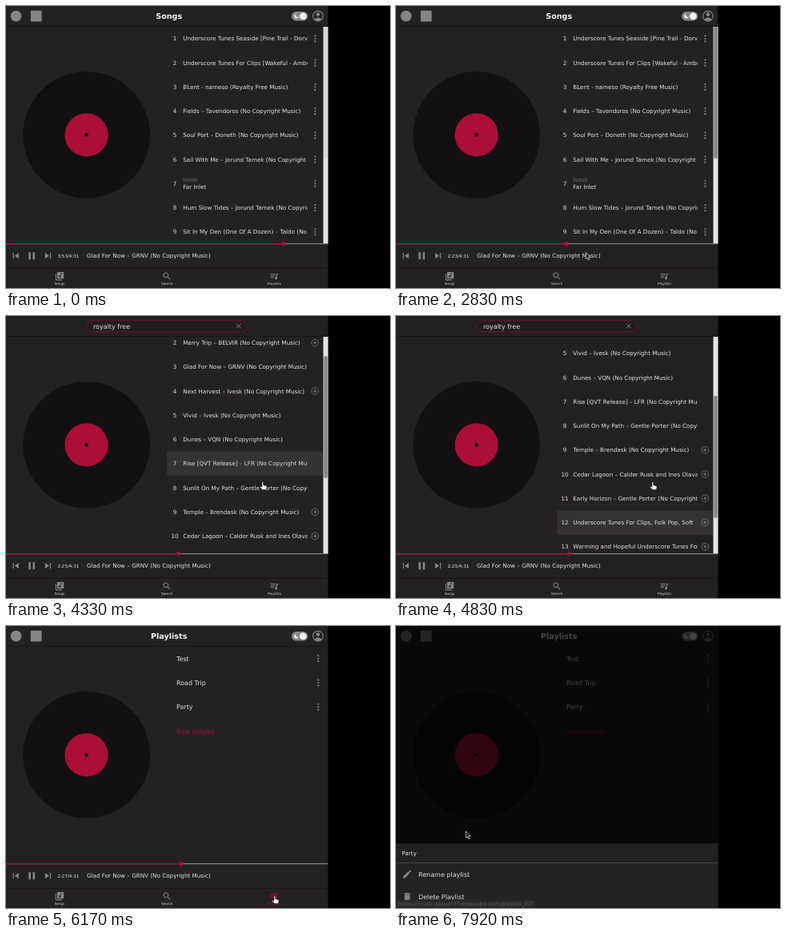
These frames come from a looping animation (480 px wide and 353 px high, 8 s). An HTML page:

```html
<!DOCTYPE html>
<html lang="en">
<head>
<meta charset="utf-8">
<title>Music player</title>
<style>
  html, body { margin: 0; width: 480px; height: 353px; overflow: hidden; background: #000; }
  svg { display: block; }
  text { font-family: "DejaVu Sans", Verdana, sans-serif; font-size: 7.2px; fill: #e2e2e2; text-rendering: geometricPrecision; }
  .big { font-size: 8px; }
  .title { font-size: 9.6px; font-weight: bold; fill: #f4f4f4; }
  .tiny { font-size: 4.15px; fill: #d8d8d8; }
  .clock { font-size: 5.6px; }
  .mid { text-anchor: middle; }
  .icon { fill: #858585; }
  .line { fill: none; stroke: #858585; }
  .hot .icon, .hot text { fill: #ab0e37; }
</style>
</head>
<body>
<svg id="stage" width="480" height="353" viewBox="0 0 480 353"></svg>
<script>
const W = 402.5, TOP = 25.7, BAR = 297.6, ROW = 30.25, LOOP = 8000, FRAME = 1000 / 12;
const TOTAL = 271, RED = '#ab0e37', BG = '#242124';
const NC = ' (No Copyright Music)';

const songs = [
  'Underscore Tunes Seaside [Pine Trail - Dorva', 'Underscore Tunes For Clips [Wakeful - Amber',
  'BLent - nameso (Royalty Free Music)', 'Fields – Tavendoros' + NC, 'Soul Port – Doneth' + NC,
  'Sail With Me – Jorund Tamek' + NC, ['Ivesk', 'Far Inlet'],
  'Hum Slow Tides – Jorund Tamek' + NC, 'Sit In My Den (One Of A Dozen) – Taldo' + NC
];
const results = [
  'Valley – VQN' + NC, 'Merry Trip – BELVIR' + NC, 'Glad For Now – GRNV' + NC, 'Next Harvest – Ivesk' + NC,
  'Vivid – Ivesk' + NC, 'Dunes – VQN' + NC, 'Rise [QVT Release] – LFR' + NC,
  'Sunlit On My Path – Gentle Porter' + NC, 'Temple – Brendask' + NC,
  'Cedar Lagoon – Calder Rusk and Ines Olava', 'Early Horizon – Gentle Porter' + NC,
  'Underscore Tunes For Clips, Folk Pop, Soft', 'Warming and Hopeful Underscore Tunes For',
  'Slow Lanterns – Doneth' + NC, 'Paper Kites – Taldo' + NC, 'Green Harbor – Brendask' + NC
];
const owned = [3, 5, 6, 7, 8];

const text = (x, y, s, cls = '', more = '') => `<text x="${x}" y="${y}" class="${cls}" ${more}>${s}</text>`;
const rect = (x, y, w, h, fill, more = '') => `<rect x="${x}" y="${y}" width="${w}" height="${h}" fill="${fill}" ${more}/>`;
const dot = (x, y, r, fill, more = '') => `<circle cx="${x}" cy="${y}" r="${r}" fill="${fill}" ${more}/>`;
// 24-unit icon centred on x, y
const icon = (x, y, k, d) => `<path class="icon" transform="translate(${x} ${y}) scale(${k}) translate(-12 -12)" d="${d}"/>`;
const kebab = (x, y) => [-3.6, 0, 3.6].map(d => dot(x, y + d, 1.1, '#858585')).join('');
const plus = (x, y) => `<path class="line" stroke-width=".8" d="M${x - 2.4} ${y}h4.8M${x} ${y - 2.4}v4.8"/>` +
  dot(x, y, 4.4, 'none', 'stroke="#777" stroke-width=".8"');
const mid = n => TOP + ROW * (n - 0.5);

function rows(list, action) {
  return list.map((s, i) => {
    const y = mid(i + 1);
    const label = Array.isArray(s)
      ? text(221.3, y - 2.1, s[0], '', 'style="fill:#6c6a6c"') + text(221.3, y + 7.1, s[1])
      : text(221.3, y + 2.5, s);
    return text(211, y + 2.5, i + 1, 'mid') + `<g clip-path="url(#cut)">${label}</g>` + action(i + 1, y);
  }).join('');
}

const bar = (id, h) => rect(396.6, 26, 6, 271, '#e4e4e4') + rect(397.3, 26, 4.6, h, '#888', `rx="2.3" id="${id}"`);

const tab = (id, x, name, d) => `<g id="${id}">${icon(x, 338.2, 0.52, d)}${text(x, 348.6, name, 'tiny mid')}</g>`;

const account = `<g class="line" stroke-width="1.2"><circle cx="390" cy="12.6" r="6.3"/></g>` +
  dot(390, 10.6, 2.3, '#858585') + '<path class="icon" d="M385.6 16.4q4.4-4 8.8 0q-4.4 4-8.8 0z"/>';
const toggle = rect(357, 7, 20.4, 11.4, '#858585', 'rx="5.7"') + dot(371.3, 12.7, 4.3, '#f2f2f2') +
  dot(363, 12.7, 2.8, '#f2f2f2') + dot(364.5, 11.5, 2.3, '#858585');

const header = `<g id="head">${dot(12.6, 12.6, 6.9, '#858585')}${rect(30.8, 5.7, 13.8, 13.8, '#858585', 'rx="1.2"')}
  ${text(203.7, 16.2, '', 'title mid', 'id="title"')}${toggle}${account}</g>`;

const search = `<g id="find">${rect(101, 5.6, 200.6, 14, '#211e21', 'rx="7" stroke="#7a1030" stroke-width=".8"')}
  ${text(109, 15.6, 'royalty free', 'big')}${rect(155.8, 8.4, 0.8, 9, '#eee', 'id="caret"')}
  <path class="line" stroke-width="1" d="M288 9.8l5.6 5.6m0-5.6l-5.6 5.6"/></g>`;

const playlists = ['Test', 'Road Trip', 'Party'].map((s, i) =>
  text(213, mid(i + 1) + 2.7, s, 'big') + kebab(390.3, mid(i + 1))).join('') +
  text(213, 135.2, 'New playlist', 'big', `style="fill:${RED}"`);

const sheet = `<g id="sheet">${rect(0, 0, W, 353, '#000', 'opacity=".72" id="dim"')}
  ${rect(0, 272.3, W, 81, BG)}${text(7.2, 287.1, 'Party')}${rect(0, 296.2, W, 0.8, '#4c4a4c')}
  ${icon(14, 310.6, 0.56, 'M3 17.25V21h3.75L17.81 9.94l-3.75-3.75L3 17.25zM20.71 7.04a1 1 0 0 0 0-1.41l-2.34-2.34a1 1 0 0 0-1.41 0l-1.83 1.83 3.75 3.75 1.83-1.83z')}
  ${text(28, 313.5, 'Rename playlist', 'big')}
  ${icon(14, 339, 0.56, 'M6 19c0 1.1.9 2 2 2h8c1.1 0 2-.9 2-2V7H6v12zM19 4h-3.5l-1-1h-5l-1 1H5v2h14V4z')}
  ${text(28, 341.9, 'Delete Playlist', 'big')}</g>
  <g id="status">${rect(0, 342.6, 174, 10.4, '#2c2a2c', 'opacity=".85"')}
  ${text(2, 350.2, 'https://music-player-f.herokuapp.com/playlist_0/7', '', 'style="font-size:6.85px;fill:#5e5c5e"')}</g>`;

document.getElementById('stage').innerHTML = `
  <defs>
    <clipPath id="cut"><rect x="220" y="0" width="156.8" height="600"/></clipPath>
    <clipPath id="view"><rect x="201" y="26" width="202" height="271"/></clipPath>
  </defs>
  ${rect(0, 0, 480, 353, '#000')}${rect(0, 0, W, 353, BG)}${rect(0, 25.2, W, 0.9, '#161416')}
  ${dot(100.6, 161.3, 79.3, '#121012')}${dot(100.6, 161.3, 27.1, RED)}${dot(100.6, 161.3, 2.4, '#1c0a10')}
  ${header}${search}
  <g clip-path="url(#view)">
    <g id="songs">${rows(songs, (n, y) => kebab(386.5, y))}${bar('thumbA', 165)}</g>
    <g id="results"><g id="list">${rect(201.2, 0, 195.4, ROW, '#343234', 'id="hover"')}
      ${rows(results, (n, y) => owned.includes(n) ? '' : plus(386.3, y))}</g>${bar('thumbB', 153)}</g>
    <g id="lists">${playlists}</g>
  </g>
  ${rect(0, BAR - 0.6, W, 1.2, '#858585')}${rect(0, BAR - 0.6, 0, 1.2, RED, 'id="done"')}${dot(0, BAR, 2.6, RED, 'id="knob"')}
  ${icon(12.2, 312.7, 0.6, 'M6 6h2v12H6zm3.5 6l8.5 6V6z')}
  ${icon(32.2, 312.7, 0.65, 'M6 19h4V5H6v14zm8-14v14h4V5h-4z')}
  ${icon(52.5, 312.7, 0.6, 'M6 18l8.5-6L6 6v12zM16 6v12h2V6h-2z')}
  ${text(64.4, 314.8, '', 'clock', 'id="clock"')}${text(101, 315.2, 'Glad For Now – GRNV' + NC)}
  ${rect(0, 327.8, W, 0.9, '#161416')}
  ${tab('tab0', 67, 'Songs', 'M20 2H8c-1.1 0-2 .9-2 2v12c0 1.1.9 2 2 2h12c1.1 0 2-.9 2-2V4c0-1.1-.9-2-2-2zm-2 5h-3v5.5a2.5 2.5 0 1 1-1-2V5h4v2zM4 6H2v14c0 1.1.9 2 2 2h14v-2H4V6z')}
  ${tab('tab1', 201.2, 'Search', 'M15.5 14h-.8l-.3-.3A6.5 6.5 0 1 0 9.5 16c1.6 0 3.1-.6 4.2-1.6l.3.3v.8l5 5 1.5-1.5-5-5zm-6 0a4.5 4.5 0 1 1 0-9 4.5 4.5 0 0 1 0 9z')}
  ${tab('tab2', 335.4, 'Playlists', 'M15 6H3v2h12V6zm0 4H3v2h12v-2zM3 16h8v-2H3v2zM17 6v8.2a3 3 0 1 0 2 2.8V8h3V6h-5z')}
  ${sheet}
  <g id="cursor">
    <path id="hand" transform="translate(.9 -.4)" fill="#fff" stroke="#111" stroke-width=".6" d="M-.9 1a.9.9 0 0 1 1.8 0V4.2l3.2.6q1.2.3 1.1 1.6L4.9 8.5 4.2 10H-.2L-3.3 6.6q-.3-1.1.8-1l1.6 1.1z"/>
    <path id="arrow" fill="#111" stroke="#eee" stroke-width=".7" d="M0 0V8.4l1.9-1.7 1.4 3 1.5-.7L3.4 6.1H6z"/>
  </g>`;

const $ = id => document.getElementById(id);
const set = (id, k, v) => $(id).setAttribute(k, v);
const show = (id, on) => set(id, 'display', on ? 'inline' : 'none');

// keys: [time, value...], linear between
function track(keys, t) {
  let i = 0;
  while (i < keys.length - 2 && t >= keys[i + 1][0]) i++;
  const [a, b] = [keys[i], keys[i + 1]];
  const k = Math.min(1, Math.max(0, (t - a[0]) / (b[0] - a[0])));
  return a.slice(1).map((v, j) => v + (b[j + 1] - v) * k);
}

const path = [
  [333, 401, 302], [750, 348, 298], [917, 348, 297], [1500, 172, 297], [1750, 172, 297],
  [2000, 214, 297], [2667, 214, 297], [2917, 249, 314], [3250, 201, 338], [3417, 201, 338],
  [3667, 327, 209], [4250, 320, 208], [5083, 320, 208], [5500, 325, 266], [5833, 335, 338],
  [6417, 335, 338], [7167, 387.5, 106], [7667, 387.5, 106], [7833, 170, 222], [7917, 87, 257]
];
const scrolls = [
  [4250, 0], [4583, 150], [4667, 168], [4750, 150], [4833, 115.2], [5000, 32], [5083, 0]
];

function play(t) {
  if (t < 1490) return 233.4 + t / 1000;
  if (t < 2240) return 115.3 + (t - 1500) / 1000;
  return 144.55 + (t - 3670) * 0.00108;
}

function draw(now) {
  const t = Math.floor((now % LOOP + 5) / FRAME) * FRAME;
  const [x, y] = track(path, t);
  const view = t < 3495 ? 0 : t < 5990 ? 1 : 2;

  show('head', view !== 1);
  show('find', view === 1);
  $('title').textContent = view ? 'Playlists' : 'Songs';
  ['songs', 'results', 'lists'].forEach((id, i) => show(id, i === view));
  show('caret', (t - 2440) % 1200 < 600);
  set('thumbA', 'fill', t < 910 ? '#d8d8d8' : '#888');

  const s = track(scrolls, t)[0];
  const row = t > 4570 && t < 5075 ? 11 : Math.floor((y + (t < 4570 ? 0 : s) - TOP) / ROW);
  set('list', 'transform', `translate(0 ${-s})`);
  set('thumbB', 'y', 26 + s * 0.642);
  set('hover', 'y', TOP + row * ROW);
  show('hover', x > 201 && y < 297);

  const sec = play(t), drag = (t > 910 && t < 1490) || (t > 1740 && t < 2240);
  const kx = drag ? x : sec / TOTAL * W;
  set('done', 'width', kx);
  set('knob', 'cx', kx);
  const n = Math.floor(sec);
  $('clock').textContent = `${Math.floor(n / 60)}:${String(n % 60).padStart(2, '0')}/4:31`;

  [67, 201.2, 335.4].forEach((c, i) =>
    set('tab' + i, 'class', y > 328 && Math.abs(x - c) < 67 ? 'hot' : ''));

  show('sheet', t > 7490);
  set('dim', 'opacity', t < 7575 ? 0.6 : 0.72);
  show('status', t > 7825);

  const hand = (t > 740 && t < 2660) || (t > 3240 && t < 6490) || (t > 7325 && t < 7575);
  show('cursor', t > 325);
  show('hand', hand);
  show('arrow', !hand);
  set('cursor', 'transform', `translate(${x} ${y})`);
}

const start = performance.now();
function loop() {
  draw(performance.now() - start);
  requestAnimationFrame(loop);
}
loop();
</script>
</body>
</html>
```
